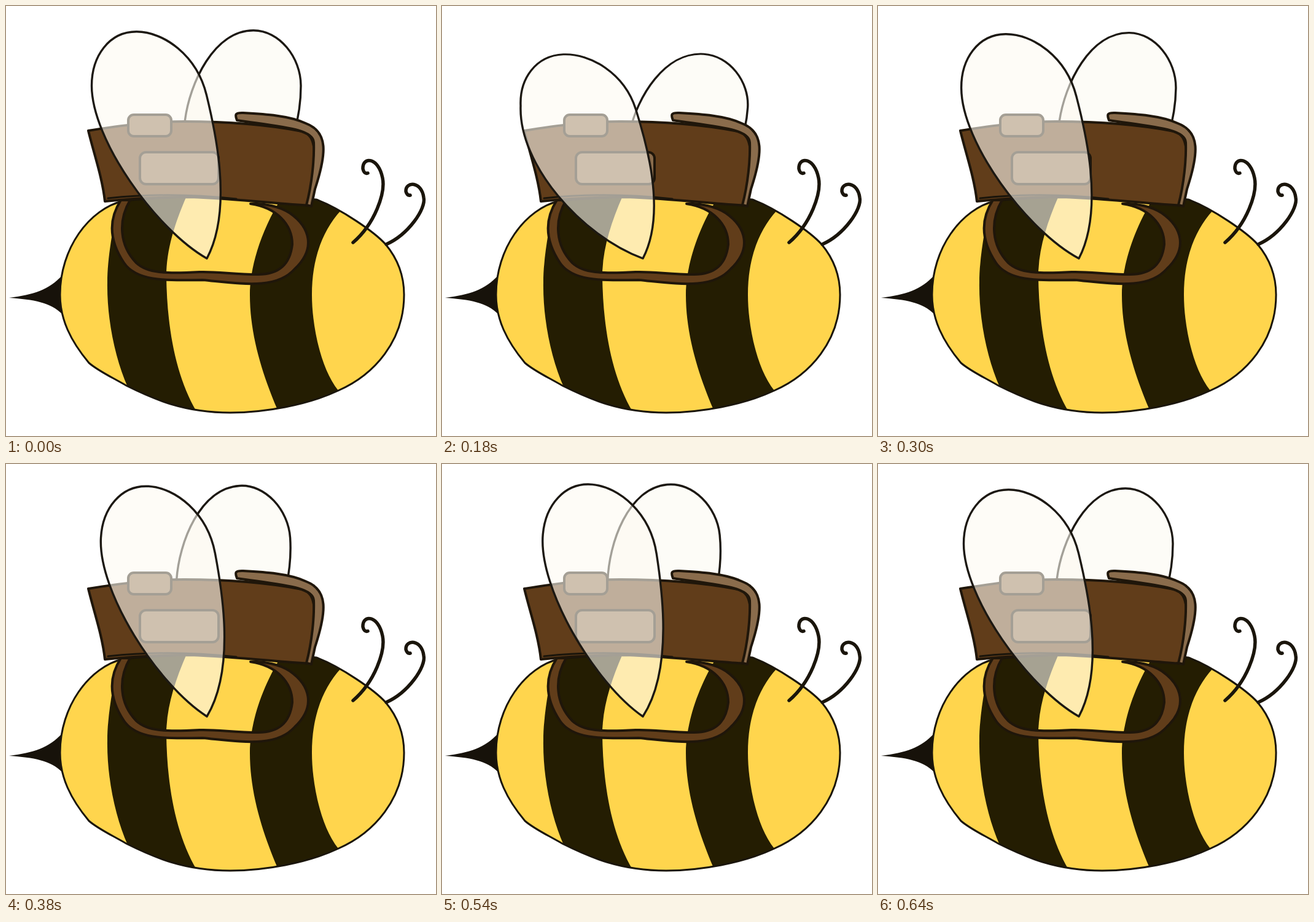
Write an HTML page that moves like this. It is 700 px wide and 700 px high and loops after 660 ms.

```html
<!DOCTYPE html>
<html lang="en">
<head>
<meta charset="utf-8">
<title>Bee with a satchel</title>
<style>
  html, body { margin: 0; width: 100%; height: 100%; overflow: hidden; background: #fff; }
  svg { display: block; width: 100vw; height: 100vh; }
  path, rect { stroke-linejoin: round; stroke-linecap: round; }
  .line { fill: none; stroke: #1a150b; stroke-width: 3; }
  .feeler { stroke-width: 5.5; }
  .wing { stroke: #1c1812; stroke-width: 3.4; }
  .dark { fill: #241d02; }
  .sting { fill: #17120a; }
  .leather { fill: #613d1a; stroke: #1f160a; stroke-width: 4; }
  .tan { fill: #8a6c4c; stroke: #1f160a; stroke-width: 4; }
</style>
</head>
<body>
<svg viewBox="0 0 700 700">
  <defs>
    <path id="body" d="M88,470 C88,395 135,330 192,317 C290,308 420,308 505,315 C545,330 600,368 618,388
      C638,412 648,440 648,470 C648,545 600,600 541,626 C490,650 420,662 365,662
      C290,662 240,640 196,618 C170,603 150,594 135,581 C105,545 88,510 88,470Z"/>
    <clipPath id="inBody"><use href="#body"/></clipPath>
  </defs>

  <path id="back" class="wing" fill="#fdfcf7" d="M320,415 C300,340 284,250 292,187 C300,125 340,40 404,40
    C446,40 481,84 481,130 C481,230 420,350 320,415Z"/>

  <path class="sting" d="M5,475 C45,470 70,462 92,438 V502 C72,482 45,478 5,475Z"/>
  <use href="#body" fill="#ffd54d"/>
  <g class="dark" clip-path="url(#inBody)">
    <path d="M185,310 C174,360 165,410 165,450 C164,510 178,575 198,620 V680 H318 L310,660
      C275,600 262,520 261,440 C261,395 276,350 296,305Z"/>
    <path d="M450,310 C412,370 397,430 397,470 C397,540 420,605 441,655 V680 H560 L541,626
      C512,590 498,520 498,470 C498,410 516,365 545,333 V300Z"/>
  </g>
  <use href="#body" class="line"/>

  <path class="leather" d="M187,316 C165,350 170,385 192,418 C215,452 275,446 320,446
    C385,452 440,462 470,428 C505,395 495,360 462,337 C445,326 420,321 398,322
    C440,328 466,355 466,388 C462,425 440,437 410,437 C370,437 345,432 315,433
    C260,436 230,435 212,418 C185,390 182,350 202,316Z"/>

  <path class="leather" d="M134,203 C190,194 235,188 290,188 C360,188 430,194 482,204
    C510,212 503,250 495,325 C440,322 380,314 300,311 C250,311 200,314 161,318 C157,280 143,240 134,203Z"/>
  <path class="line" stroke-width="2" d="M166,313 C230,306 300,306 375,314"/>
  <rect class="tan" x="199" y="177" width="70" height="35" rx="9"/>
  <rect class="tan" x="218" y="238" width="128" height="52" rx="10"/>
  <path class="tan" d="M376,186 C372,176 374,174 384,174 C420,176 460,178 488,191
    C525,205 522,240 503,298 L497,326 L489,324 C498,290 502,250 501,222 C500,200 450,197 376,186Z"/>

  <path class="line feeler" d="M565,385 C600,355 618,305 613,280 C606,245 580,245 581,265 Q583,274 589,272"/>
  <path class="line feeler" d="M619,388 C655,372 684,330 680,312 C677,285 650,285 651,302 Q653,309 658,308"/>

  <path id="front" class="wing" fill="#fdfaf2" fill-opacity=".6"/>
</svg>
<script>
const front = document.getElementById('front');
const back = document.getElementById('back');
const STEP = 20, STEPS = 33, BEAT = 640, LOWEST = 160;

// The trailing edge bulges as the wing droops.
const frontShape = droop => `M327,411 C${244 - 16 * droop},${364 + 2 * droop}
  ${139 - 8 * droop},${218 + 17 * droop} 139,130 C139,82 167,42 212,42
  C256,42 310,80 326,145 C338,194 371,328 327,411Z`;

function place(wing, x, y, angle, stretch) {
  wing.setAttribute('transform',
    `translate(${x} ${y}) rotate(${angle}) scale(1 ${stretch}) translate(${-x} ${-y})`);
}

const start = performance.now();
function draw() {
  const step = Math.floor((performance.now() - start) / STEP) % STEPS;
  const swing = Math.cos(2 * Math.PI * (step * STEP - LOWEST) / BEAT);
  const mid = 1 - swing * swing;
  const droop = Math.max(0, swing) ** 1.6;
  const stretch = 1 - 0.088 * droop;

  front.setAttribute('d', frontShape(droop));
  place(front, 327, 411, 1.9 - 4.4 * swing - 1.8 * mid, stretch);
  place(back, 320, 415, -1.6 + 5.4 * swing + 1.4 * mid, stretch);
  requestAnimationFrame(draw);
}
draw();
</script>
</body>
</html>
```
